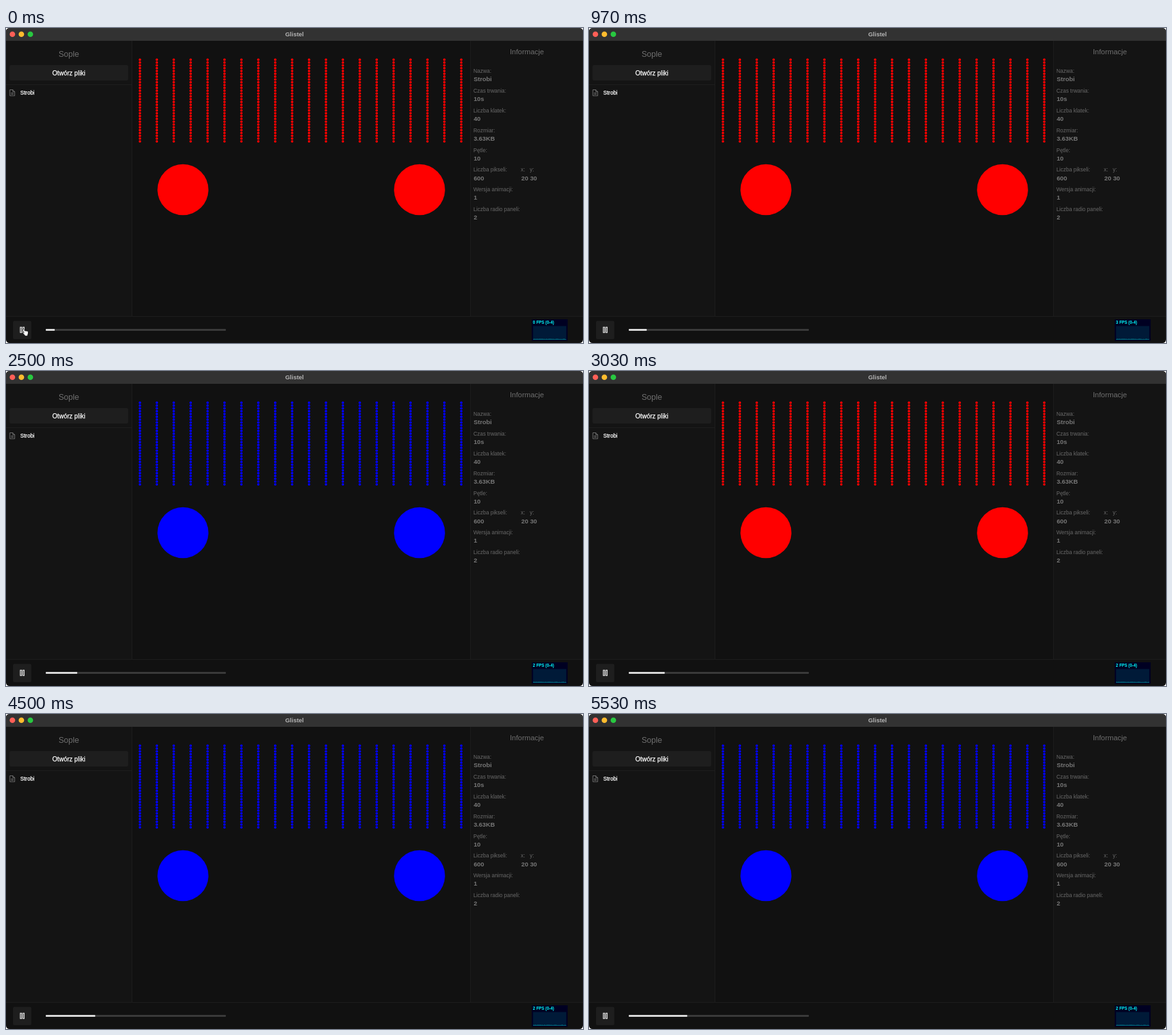
Write an HTML page that moves like this. It is 900 by 492 pixels and loops after 5.83 s.

```html
<!DOCTYPE html>
<html lang="pl">
<head>
<meta charset="utf-8">
<title>Glistel</title>
<style>
  html, body { margin: 0; width: 100%; height: 100%; overflow: hidden; background: #fff; }
  svg { display: block; width: 900px; height: 492px; }
  text { font-family: "Liberation Sans", Arial, sans-serif; fill: #6f6f6f; }
  .bold { font-weight: bold; }
  .label { font-size: 8.45px; fill: #696969; }
  .value { font-size: 9.8px; font-weight: bold; fill: #767676; }
  .mid { text-anchor: middle; }
  .white { fill: #fff; stroke: #fff; stroke-width: .25px; }
  .line { stroke: #1d1d1d; }
</style>
</head>
<body>
<svg viewBox="0 0 900 492">
  <defs><clipPath id="win"><rect width="900" height="492" rx="5.5"/></clipPath></defs>
  <g clip-path="url(#win)">
    <rect width="900" height="492" fill="#111"/>
    <rect y="20" width="196" height="430" fill="#141414"/>
    <rect x="725" y="20" width="175" height="430" fill="#141414"/>
    <rect width="900" height="20" fill="#323232"/>
    <path class="line" d="M196.5 20V450M724.5 20V450M0 450.5H900M0 88.5H196"/>

    <circle cx="10" cy="9.7" r="4.3" fill="#ff5f57"/>
    <circle cx="24" cy="9.7" r="4.3" fill="#febc2e"/>
    <circle cx="38" cy="9.7" r="4.3" fill="#28c840"/>
    <text class="bold mid" x="450" y="13" font-size="9.5" style="fill:#b4b4b4">Glistel</text>

    <text class="mid" x="98" y="44.5" font-size="12.6">Sople</text>
    <rect x="5.5" y="58" width="185" height="24" rx="2" fill="#1e1e1e"/>
    <text class="white mid" x="98" y="73.7" font-size="10">Otwórz pliki</text>
    <path d="M6 96.5h4.6l3 3v6.3H6zM10.6 96.5v3h3M7.7 101.5h4.2M7.7 103.5h4.2" fill="none" stroke="#858585" stroke-width=".8"/>
    <text class="white" x="22.3" y="104" font-size="8.5">Strobi</text>

    <text class="mid" x="812.5" y="41" font-size="11.4">Informacje</text>
    <g id="info"></g>
    <g id="lights"></g>

    <rect x="11" y="457.5" width="28.5" height="28.5" rx="2" fill="#1e1e1e"/>
    <path d="M22.3 467.3h2.1v8.4h-2.1zM26.3 467.3h2.1v8.4h-2.1z" fill="none" stroke="#f2f2f2" stroke-width="1.1"/>
    <path id="hand" d="M26.4 470.6c.9-.8 1.7-.1 2.2.8l1.1 2c.6-.8 1.4-.6 1.7 0 .7-.6 1.3-.3 1.6.3 .8-.3 1.4.1 1.5 1 .2 1.6.2 3-.7 4.4v1.9h-4.3l-.4-1.3-2.7-2.9c-.7-.9.2-1.6 1.1-1l.7.5-1.8-3.7c-.3-.7-.4-1.5 0-2z" fill="#fff" stroke="#000" stroke-width=".7"/>

    <rect x="62" y="470" width="281" height="3" rx="1" fill="#3a3a3a"/>
    <rect id="bar" x="62" y="470" height="3" rx="1" fill="#d9d9d9"/>

    <rect x="820" y="455" width="56" height="33.6" fill="#002"/>
    <rect x="822.1" y="465.5" width="51.8" height="21" fill="#001a38"/>
    <text id="fps" class="bold" x="821.8" y="461.8" font-size="6.4" style="fill:#0ff"></text>
    <path id="graph" fill="#0ff" opacity=".75"/>
  </g>
</svg>
<script>
const LOOP = 5830, HIDE_HAND = 70;
const STEPS = [0, 470, 970, 1500, 2000, 2500, 3030, 3530, 4030, 4500, 5070, 5530];
const FPS = [0, 3, 2, 2, 2, 2];
const get = id => document.getElementById(id);
const lights = get('lights'), hand = get('hand'), bar = get('bar'), fps = get('fps'), graph = get('graph');

const INFO = [
  ['Nazwa:', 'Strobi'], ['Czas trwania:', '10s'], ['Liczba klatek:', '40'], ['Rozmiar:', '3.63KB'],
  ['Pętle:', '10'], ['Liczba pikseli:', '600'], ['Wersja animacji:', '1'], ['Liczba radio paneli:', '2']
];
const label = (x, y, s) => `<text class="label" x="${x}" y="${y}">${s}</text>`;
const value = (x, y, s) => `<text class="value" x="${x}" y="${y}">${s}</text>`;
get('info').innerHTML = INFO.map(([name, val], i) => {
  const y = 69.8 + i * 30.93;
  return label(729, y, name) + value(729.4, y + 13.1, val);
}).join('') + label(803, 224.4, 'x:') + label(817, 224.4, 'y:') + value(803.8, 237.5, '20 30');

const disc = (x, y, r) => `<circle cx="${x}" cy="${y}" r="${r}"/>`;
let dots = disc(276, 252.5, 39.7) + disc(645, 252.5, 39.7);
for (let c = 0; c < 20; c++)
  for (let r = 0; r < 30; r++) dots += disc(208.9 + c * 26.38, 49.5 + r * 4.4, 1.9);
lights.innerHTML = dots;

const noise = n => { const s = Math.sin(n * 12.9898) * 43758.5453; return s - Math.floor(s); };

// One column per second, newest at the right
function history(tick) {
  let d = '';
  for (let i = 0; i < 74; i++) {
    const h = noise(i + tick + 1) > .3 ? .75 : .4;
    d += `M${822.1 + i * .7} ${486.5 - h}h.7v${h}h-.7z`;
  }
  return d;
}

let last = -1;
function draw() {
  const t = performance.now() % LOOP;
  const step = STEPS.filter(s => s <= t).length - 1;
  hand.style.display = t < HIDE_HAND ? '' : 'none';
  if (step !== last) {
    last = step;
    const tick = step >> 1;
    lights.setAttribute('fill', step % 2 ? '#00f' : '#f00');
    bar.setAttribute('width', (step + 2) * 281 / 40);
    fps.textContent = `${FPS[tick]} FPS (0-4)`;
    graph.setAttribute('d', history(tick));
  }
  requestAnimationFrame(draw);
}
draw();
</script>
</body>
</html>
```
